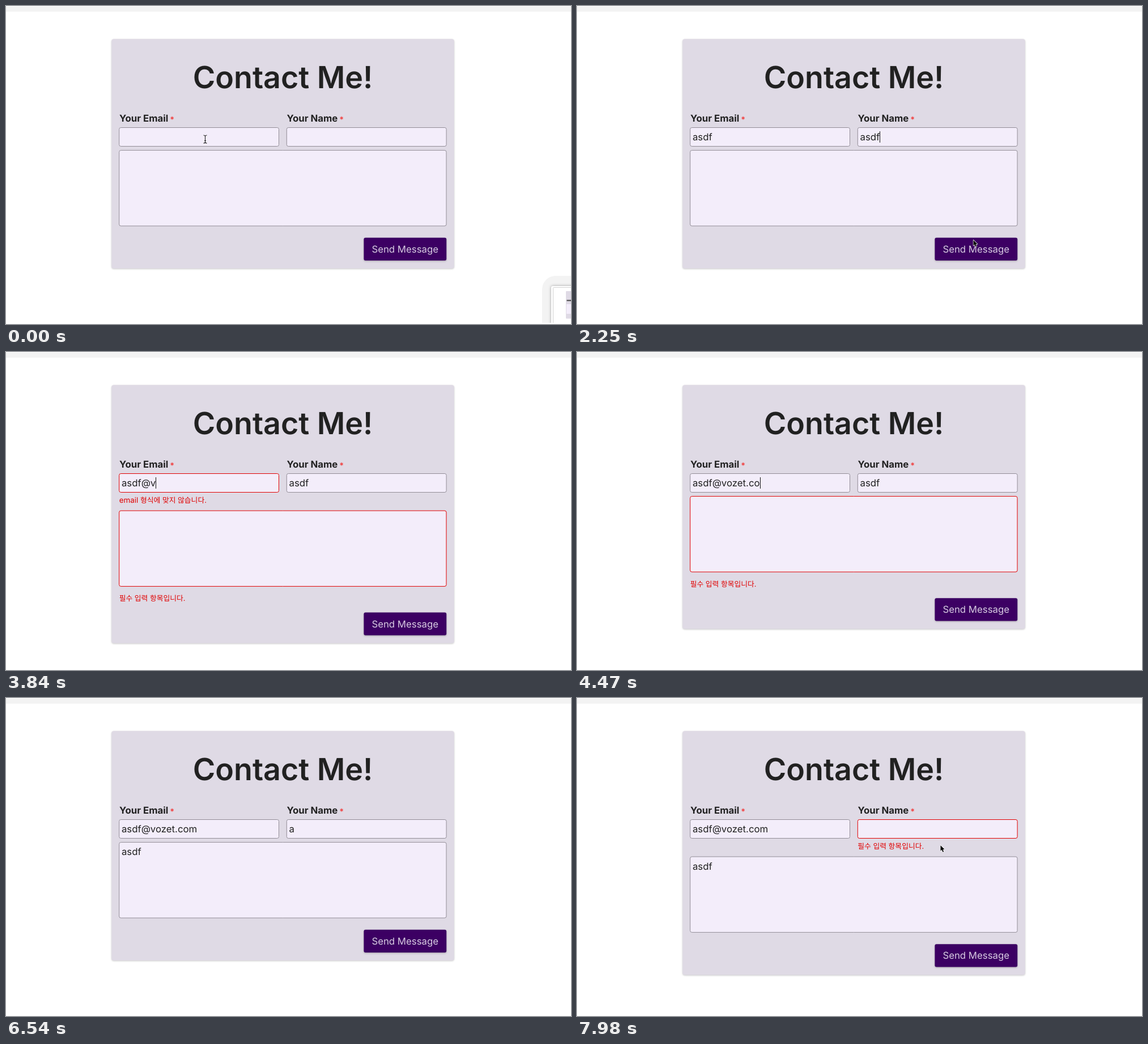
These frames come from a looping animation (997 px wide and 561 px high, 8 s). An HTML page with a canvas:

```html
<!DOCTYPE html>
<html lang="en">
<head>
<meta charset="utf-8">
<title>Contact form</title>
<style>
html, body { margin: 0; width: 100%; height: 100%; overflow: hidden; background: #fff; }
canvas { display: block; width: 997px; height: 561px; }
</style>
</head>
<body>
<canvas id="stage"></canvas>
<script>
const W = 997, H = 561, LOOP = 8000;
const SIZE = 16.8, ROW = 25.4, LEFT = 199.7, RIGHT = 495.3;
const KEY = 88, SUBMIT = 2460;
const canvas = document.getElementById('stage');
const ctx = canvas.getContext('2d');
const dpr = window.devicePixelRatio || 1;
canvas.width = W * dpr;
canvas.height = H * dpr;

const COLOR = {
  card: '#dfdae5', field: '#f3edfa', border: '#928d97', error: '#e00000',
  ink: '#212121', star: '#f04040', button: '#3c0063', label: '#d8cce2', bar: '#f3f3f3'
};
const REQUIRED = '필수 입력 항목입니다.';

// Typed at a steady pace from a start time; '<' is backspace
const typing = [
  { field: 'email', keys: 'asdf', start: 900 },
  { field: 'name', keys: 'asdf', start: 1530 },
  { field: 'email', keys: '@', start: 3570 },
  { field: 'email', keys: 'vozet.com', start: 3840 },
  { field: 'message', keys: 'asdf', start: 5430 },
  { field: 'name', keys: '<<<', start: 6270 },
  { field: 'name', keys: '<', start: 6660 }
];
const focusChanges = [
  { at: 510, field: 'email' }, { at: 1410, field: 'name' }, { at: SUBMIT, field: '' },
  { at: 3540, field: 'email' }, { at: 5220, field: 'message' }, { at: 5850, field: 'name' },
  { at: 6540, field: '' }
];
const home = [351.5, 235];
const moves = [
  { start: 510, end: 750, to: [524.5, 254.5] },
  { start: 1320, end: 1440, to: [585, 234] },
  { start: 2040, end: 2250, to: [699.5, 413] },
  { start: SUBMIT, end: 2670, to: [709, 432] },
  { start: 2850, end: 3240, to: [323, 235] },
  { start: 4950, end: 5220, to: [480, 320] },
  { start: 5760, end: 5910, to: [640, 235] },
  { start: 7050, end: 7350, to: [700, 452] },
  { start: 7500, end: 7980, to: [641.5, 260] }
];

const progress = (t, a, b) => Math.min(1, Math.max(0, (t - a) / (b - a)));
const smooth = p => p * p * (3 - 2 * p);
const mix = (a, b, p) => a + (b - a) * p;

function formAt(t) {
  const form = { email: '', name: '', message: '' };
  for (const { field, keys, start } of typing) {
    const count = Math.max(0, Math.floor((t - start) / KEY) + 1);
    for (const key of keys.slice(0, count)) {
      form[field] = key === '<' ? form[field].slice(0, -1) : form[field] + key;
    }
  }
  return form;
}

function errorsAt(t, form) {
  const sent = t >= SUBMIT;
  return {
    email: sent && !/^\w+@\w+\.\w{2,}$/.test(form.email),
    name: sent && !form.name,
    message: sent && !form.message
  };
}

function focusAt(t) {
  const past = focusChanges.filter(c => t >= c.at);
  return past.length ? past[past.length - 1].field : '';
}

function mouseAt(t) {
  return moves.reduce(([x, y], { start, end, to }) => {
    const p = smooth(progress(t, start, end));
    return [mix(x, to[0], p), mix(y, to[1], p)];
  }, home);
}

// Typing hides the mouse until it moves again
function mouseShown(t) {
  const latest = list => Math.max(0, ...list.map(e => e.start).filter(s => s <= t));
  return latest(moves) >= latest(typing);
}

function text(str, x, y, size = SIZE, color = COLOR.ink, weight = 400) {
  ctx.font = `${weight} ${size}px Inter, "Noto Sans CJK KR", "Noto Sans CJK", sans-serif`;
  ctx.fillStyle = color;
  ctx.fillText(str, x, y);
  return ctx.measureText(str).width;
}

function box(x, y, w, h, r, fill, stroke) {
  ctx.beginPath();
  ctx.roundRect(x, y, w, h, r);
  ctx.fillStyle = fill;
  ctx.fill();
  if (stroke) {
    ctx.strokeStyle = stroke;
    ctx.lineWidth = 1;
    ctx.stroke();
  }
}

function shadowBox(x, y, w, h, r, fill, alpha, blur, dy) {
  ctx.save();
  ctx.shadowColor = `rgba(0,0,0,${alpha})`;
  ctx.shadowBlur = blur * dpr;
  ctx.shadowOffsetY = dy * dpr;
  box(x, y, w, h, r, fill);
  ctx.restore();
}

function field(x, y, w, h, value, bad, focused) {
  box(x, y, w, h, 3, COLOR.field, bad ? COLOR.error : COLOR.border);
  const width = text(value, x + 4.2, y + 22.5);
  if (focused) {
    ctx.fillStyle = '#111';
    ctx.fillRect(Math.round(x + 4.2 + width), y + 6.5, 1, 20);
  }
}

function label(str, x) {
  const w = text(str, x, 204.2, SIZE, COLOR.ink, 700);
  text('*', x + w + 3, 204.8, 14, COLOR.star, 700);
}

function errorText(str, x, y) {
  text(str, x, y, 12.8, COLOR.error);
}

function title() {
  ctx.save();
  ctx.translate(488.5, 145.2);
  ctx.scale(3.2, 3.2);
  ctx.textAlign = 'center';
  text('Contact Me!', 0, 0, SIZE, COLOR.ink, 600);
  ctx.restore();
}

function preview(t) {
  const p = progress(t, 480, 690);
  if (p === 1) return;
  ctx.save();
  ctx.beginPath();
  ctx.rect(0, 0, W, 559);
  ctx.clip();
  ctx.translate(60 * p * p, 0);
  box(946, 476, 120, 140, 24, COLOR.bar);
  shadowBox(962, 494, 100, 100, 3, '#fff', 0.35, 5, 0);
  box(965.5, 496.5, 100, 100, 1, '#fff', '#d2d2d2');
  box(988, 503, 40, 48.5, 1, COLOR.card);
  box(989, 526, 40, 17, 0, COLOR.field);
  ctx.fillStyle = '#444';
  ctx.fillRect(989.5, 518.5, 8, 2);
  ctx.restore();
}

function beam(x, y) {
  ctx.beginPath();
  for (const s of [-1, 1]) {
    ctx.moveTo(x - 3, y + 7 * s);
    ctx.quadraticCurveTo(x, y + 7 * s, x, y + 5 * s);
    ctx.quadraticCurveTo(x, y + 7 * s, x + 3, y + 7 * s);
  }
  ctx.moveTo(x, y - 5.5);
  ctx.lineTo(x, y + 5.5);
  ctx.moveTo(x - 1.5, y + 2.5);
  ctx.lineTo(x + 1.5, y + 2.5);
  ctx.strokeStyle = '#222';
  ctx.lineWidth = 1.1;
  ctx.stroke();
}

function arrow(x, y) {
  ctx.save();
  ctx.translate(x, y);
  ctx.scale(0.85, 0.85);
  ctx.lineJoin = 'round';
  ctx.lineWidth = 1.6;
  ctx.strokeStyle = '#fff';
  ctx.fillStyle = '#000';
  const shape = new Path2D('M0 0V11.5L2.6 9.2L4.6 13.8L6.7 12.9L4.7 8.4L8.2 8.2Z');
  ctx.stroke(shape);
  ctx.fill(shape);
  ctx.restore();
}

function mouse(t, areaTop) {
  if (!mouseShown(t)) return;
  const [x, y] = mouseAt(t);
  const inside = (left, top, w, h) => x >= left && x <= left + w && y >= top && y <= top + h;
  const overText = inside(LEFT, 214, 282, 34) || inside(RIGHT, 214, 282, 34)
    || inside(LEFT, areaTop - 1, 577, 134);
  (overText ? beam : arrow)(x, y);
}

function draw(t) {
  ctx.setTransform(dpr, 0, 0, dpr, 0, 0);
  ctx.textRendering = 'geometricPrecision';
  ctx.fillStyle = '#fff';
  ctx.fillRect(0, 0, W, H);
  ctx.fillStyle = COLOR.bar;
  ctx.fillRect(0, 1, W, 9);

  const form = formAt(t), bad = errorsAt(t, form), focus = focusAt(t);
  const shift = bad.email || bad.name ? ROW : 0;
  const drop = shift + (bad.message ? ROW : 0);
  const areaTop = 254.6 + shift;
  const input = (id, x, y, w, h) => field(x, y, w, h, form[id], bad[id], focus === id);

  shadowBox(186.3, 58.2, 604.4, 404.8 + drop, 4, COLOR.card, 0.22, 3, 1);
  title();
  label('Your Email', 200);
  label('Your Name', 495.5);
  input('email', LEFT, 214.5, 281.8, 33);
  input('name', RIGHT, 214.5, 281.8, 33);
  input('message', LEFT, areaTop, 577.3, 133.4);

  if (bad.email) {
    const w = text('email ', LEFT, 266, 13.4, COLOR.error);
    errorText('형식에 맞지 않습니다.', LEFT + w, 266);
  }
  if (bad.name) errorText(REQUIRED, RIGHT, 266);
  if (bad.message) errorText(REQUIRED, LEFT, 413.5 + shift);

  shadowBox(631.4, 408.8 + drop, 145.8, 40.2, 3, COLOR.button, 0.25, 3, 1.2);
  text('Send Message', 645.4, 435 + drop, SIZE, COLOR.label);

  preview(t);
  mouse(t, areaTop);
}

function tick(now) {
  draw(now % LOOP);
  requestAnimationFrame(tick);
}
draw(0);
requestAnimationFrame(tick);
</script>
</body>
</html>
```
